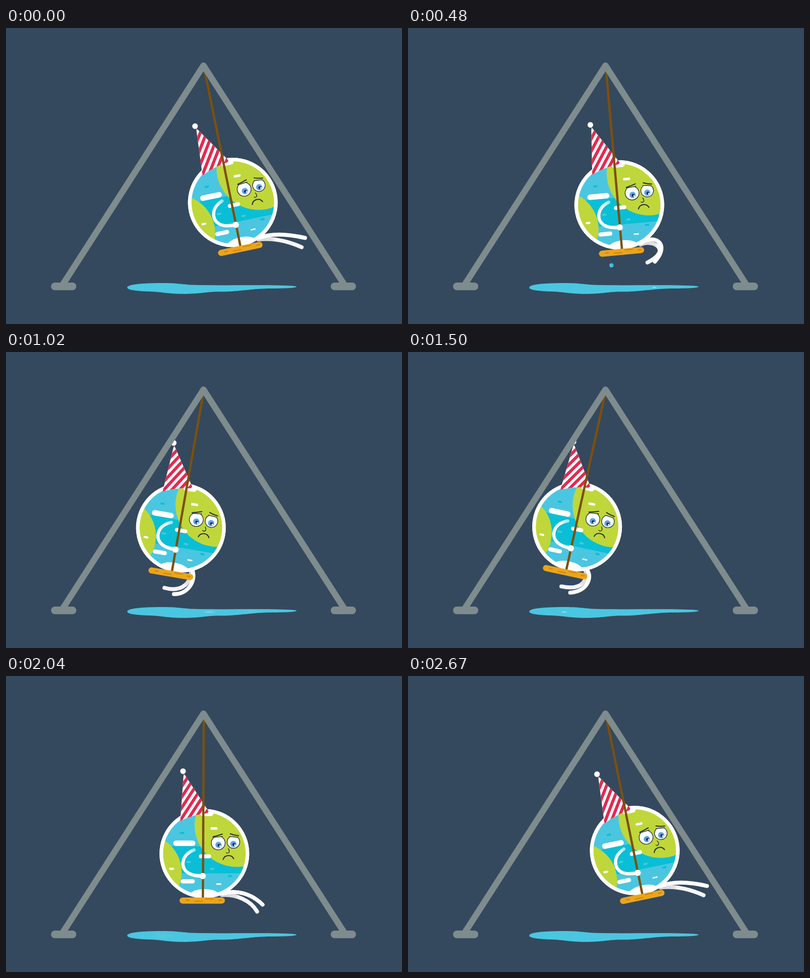
Animation of 800x600 px, one loop 2.7 s. Source, as an HTML page:

```html
<!DOCTYPE html>
<html lang="en">
<head>
<meta charset="utf-8">
<title>Globe on a swing</title>
<style>
  html, body { margin: 0; width: 100%; height: 100%; overflow: hidden; background: #34495e; }
  svg { display: block; width: 100%; height: 100%; }
  .line { fill: none; stroke-linecap: round; stroke-linejoin: round; }
</style>
</head>
<body>
<svg viewBox="0 0 800 600">
  <defs>
    <clipPath id="ball"><circle cx="400.8" cy="360" r="85"/></clipPath>
    <clipPath id="cone"><path d="M359 197 L352 294 Q378 281 406 278 Q411 276 408 272 Z"/></clipPath>
    <clipPath id="lidL"><path d="M410 328 L446 324.5 V360 H410 Z"/></clipPath>
    <clipPath id="lidR"><path d="M443 324.5 L476 327.5 V360 H443 Z"/></clipPath>
    <radialGradient id="shade" gradientUnits="userSpaceOnUse" cx="438" cy="444" r="32">
      <stop offset="0" stop-color="#d6d6da"/>
      <stop offset=".85" stop-color="#e2e2e6"/>
      <stop offset="1" stop-color="#f6f6fa"/>
    </radialGradient>
    <radialGradient id="arm" gradientUnits="userSpaceOnUse" cx="381" cy="352" r="15">
      <stop offset="0" stop-color="#fff" stop-opacity=".55"/>
      <stop offset="1" stop-color="#fff"/>
    </radialGradient>
  </defs>

  <path fill="#4bc6e0" d="M245 526 C246 520 272 517 318 517 C350 517 358 520.5 385 521 C440 522 500 521 540 521.5 C565 522 587 522.5 587 524.5 C587 527 560 528 530 528 C490 529 470 534.5 430 534.5 C408 534 395 539 358 539 C325 539 310 534 285 534 C262 533 245 531 245 526 Z"/>
  <g id="ripples"></g>
  <g id="drops"></g>

  <g id="swing">
    <path id="legB" class="line" stroke="url(#shade)" stroke-width="8"/>
    <path id="legA" class="line" stroke="#fff" stroke-width="8"/>

    <circle cx="400.8" cy="360" r="90.6" fill="#fff"/>
    <g clip-path="url(#ball)">
      <rect x="310" y="269" width="182" height="182" fill="#4bc6e0"/>
      <rect x="310" y="345" width="182" height="55" fill="#0abfd5"/>
      <g fill="#bfd73a">
        <circle cx="466" cy="302" r="85"/>
        <circle cx="278" cy="398" r="77"/>
      </g>
      <ellipse cx="401" cy="446" rx="31" ry="14" fill="#fff"/>
    </g>
    <circle cx="400.8" cy="360" r="87" fill="none" stroke="#fff" stroke-width="7.2"/>
    <g id="dashes"></g>

    <g id="face">
      <g stroke="#222b33" stroke-width="1.3">
        <g clip-path="url(#lidL)"><circle cx="428.7" cy="338.4" r="14" fill="#fff"/></g>
        <path class="line" d="M419 327.2 L437.6 325.4"/>
        <g clip-path="url(#lidR)"><circle cx="459.5" cy="336.5" r="12.7" fill="#fff"/></g>
        <path class="line" d="M452 325.4 L468.5 327"/>
      </g>
      <g id="pupils"></g>
      <g class="line" stroke="#222b33" stroke-width="2">
        <path d="M418 326 Q427 324 437 320.5"/>
        <path d="M453 319.7 Q461 323 470 323.8"/>
        <path stroke-width="1.4" d="M449 350 Q453 356 449.5 358.5 Q447 360 445 358"/>
        <path d="M438.5 372 C442 361.5 456 361.5 460 370.5"/>
      </g>
    </g>

    <rect x="392" y="272" width="27.5" height="12" rx="6" fill="#fff"/>
    <g id="hat" clip-path="url(#cone)">
      <rect x="345" y="190" width="70" height="110" fill="#fff"/>
    </g>
    <circle cx="357.6" cy="193" r="5.7" fill="#fff"/>

    <path class="line" stroke="url(#arm)" stroke-width="6.5" d="M380 352.5 C366 358 357 368 357.5 382 C358.5 398 375 406 397 405.5"/>
    <path stroke="#7d500c" stroke-width="4.6" d="M399.6 80 L397.8 450"/>
    <circle cx="397.5" cy="405.5" r="6.3" fill="#fff"/>
    <rect x="350.7" y="449" width="91.6" height="12.4" rx="6.2" fill="#eba51c"/>
    <path class="line" stroke="#cf8a0c" stroke-width="2.4" d="M364 454.5 h6 M382 456.6 h15 M404 452 h15 M430 454.5 h6"/>
  </g>

  <path class="line" stroke="#7f8c8d" stroke-width="12.6" d="M115.4 519 L399 76.2 L682.6 519"/>
  <g fill="#7f8c8d">
    <rect x="91" y="516" width="51" height="15.4" rx="7.7"/>
    <rect x="656" y="516" width="51" height="15.4" rx="7.7"/>
  </g>
</svg>

<script>
const LOOP = 2700, HALF = LOOP / 2, STEP = 30;
const $ = id => document.getElementById(id);

function add(parent, tag, attrs) {
  const el = document.createElementNS('http://www.w3.org/2000/svg', tag);
  set(el, attrs);
  parent.appendChild(el);
  return el;
}
function set(el, attrs) {
  for (const k in attrs) el.setAttribute(k, attrs[k]);
}

// x, y, width, height, colour
const SEA = '#4bc6e0', DEEP = '#0abfd5', WHITE = '#fff';
[
  [338, 333.5, 44.5, 11, WHITE], [389.5, 361.5, 25, 8, WHITE], [353, 412, 28.5, 8.4, WHITE],
  [413, 306.5, 14.5, 5, WHITE], [329.5, 388.5, 10, 4.4, WHITE], [424.5, 420.3, 10.5, 3, WHITE],
  [351.5, 316, 9, 4, DEEP], [448, 403.5, 9, 4, DEEP],
  [364, 375, 9.5, 4, SEA], [412, 389, 9, 4, SEA]
].forEach(([x, y, width, height, fill]) =>
  add($('dashes'), 'rect', { x, y, width, height, rx: height / 2, fill }));

for (const [x, y] of [[429.4, 342.3], [459.4, 340.5]]) {
  const dot = (dx, dy, r, fill) => add($('pupils'), 'circle', { cx: x + dx, cy: y + dy, r, fill });
  dot(0, 0, 6.3, '#5aa5ec');
  dot(1, 1, 2.9, '#1d2c44');
  dot(3, 2.4, 1.7, WHITE);
}

// diagonal hat stripes
const stripes = add($('hat'), 'g', { transform: 'translate(352 293) rotate(-57)', fill: '#e5294f' });
for (let i = -4; i <= 4; i++)
  add(stripes, 'rect', { x: -60, y: i * 11.7 - 3.1, width: 200, height: 6.2 });

// cubic ease-in-out (.42, 0, .58, 1)
function ease(u) {
  if (u <= 0) return 0;
  if (u >= 1) return 1;
  let lo = 0, hi = 1, s;
  for (let i = 0; i < 24; i++) {
    s = (lo + hi) / 2;
    const x = 3 * (1 - s) * (1 - s) * s * 0.42 + 3 * (1 - s) * s * s * 0.58 + s ** 3;
    if (x < u) lo = s; else hi = s;
  }
  return s * s * (3 - 2 * s);
}

// leg curves: stretched, half bent, tucked
const LEG_A = [
  [438, 441, 462, 437, 492, 443, 529, 460],
  [438, 441, 466, 424, 497, 448, 461.7, 481],
  [438, 441, 449, 458, 440, 490, 409.5, 495]
];
const LEG_B = [
  [436, 444, 462, 446, 488, 455, 518.5, 477],
  [436, 444, 462, 434, 500, 461, 446.6, 481.4],
  [436, 444, 440, 462, 428, 490, 388.5, 485.6]
];
function bend([a, b, c], k) {
  const wa = (1 - k) * (1 - 2 * k), wb = 4 * k * (1 - k), wc = k * (2 * k - 1);
  const p = a.map((v, i) => (v * wa + b[i] * wb + c[i] * wc).toFixed(2));
  return `M${p[0]} ${p[1]} C${p.slice(2).join(' ')}`;
}

const FALL = 330, SPREAD = 850;
const drops = [[498, 370], [411, 640], [315.5, 1335]].map(([x, land]) => {
  const ring = () => add($('ripples'), 'ellipse', {
    cx: x, cy: x > 450 ? 525.8 : 527, fill: 'none', stroke: '#a5e4f1', 'stroke-width': 0.9
  });
  const drop = add($('drops'), 'g', {});
  add(drop, 'circle', { r: 4.1, fill: SEA });
  add(drop, 'circle', { cx: 0.8, cy: -0.4, r: 1.8, fill: '#25b3d2' });
  return { x, land, drop, rings: [ring(), ring()] };
});

function draw(t) {
  const swing = t < HALF ? ease(t / HALF) : 1 - ease((t - HALF) / HALF);
  set($('swing'), { transform: `rotate(${24.45 * swing - 11.75} 399 78)` });

  const tuck = t < HALF ? ease(t / 960) : 1 - ease((t - HALF) / 850);
  set($('legA'), { d: bend(LEG_A, tuck) });
  set($('legB'), { d: bend(LEG_B, tuck) });

  for (const { x, land, drop, rings } of drops) {
    const u = (t - land + FALL) / FALL, age = t - land;
    const falling = u > 0 && u < 1;
    set(drop, {
      visibility: falling ? 'visible' : 'hidden',
      transform: `translate(${x} ${465 + 61 * u * u}) scale(${Math.min(1, Math.max(0, u * 4))})`
    });
    const live = age >= 0 && age < SPREAD;
    rings.forEach((ring, i) => {
      const rx = Math.max(0, 1 + 0.0275 * age) * (i ? 0.48 : 1);
      set(ring, {
        visibility: live ? 'visible' : 'hidden',
        rx, ry: rx * 0.15,
        opacity: live ? 0.9 * (1 - age / SPREAD) : 0
      });
    });
  }
}

const start = performance.now();
function tick() {
  const t = (performance.now() - start) % LOOP;
  draw(Math.floor(t / STEP) * STEP);
  requestAnimationFrame(tick);
}
draw(0);
requestAnimationFrame(tick);
</script>
</body>
</html>
```
